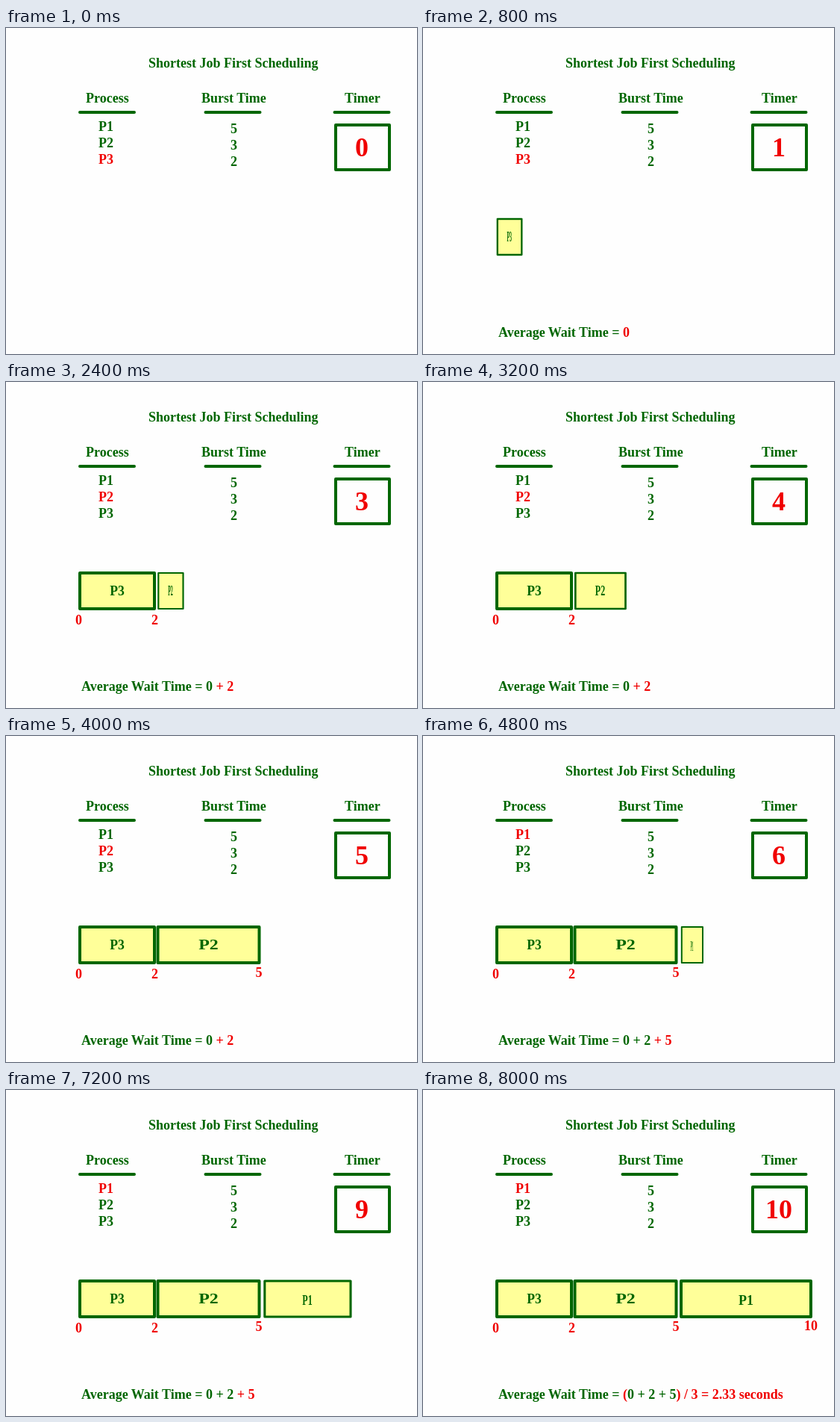
Write an HTML page that moves like this. It is 551 px wide and 437 px high and loops after 8800 ms.

```html
<!DOCTYPE html>
<html lang="en">
<head>
<meta charset="utf-8">
<title>Shortest Job First Scheduling</title>
<style>
  html, body { margin: 0; width: 100%; height: 100%; overflow: hidden; background: #fefefe; }
  svg { display: block; }
  text { font: bold 18px "Liberation Serif", "Times New Roman", serif; fill: #060; white-space: pre; }
  .mid { text-anchor: middle; }
  .red { fill: #f00000; }
  #timer { font-size: 36px; }
  .rule, .box { stroke: #060; stroke-width: 4; stroke-linecap: round; stroke-linejoin: round; fill: none; }
  .bar { fill: #ff9; }
</style>
</head>
<body>
<svg id="stage" width="551" height="437" viewBox="0 0 551 437">
  <text x="191" y="53">Shortest Job First Scheduling</text>
  <text x="107" y="100">Process</text>
  <text x="262" y="100">Burst Time</text>
  <text x="454" y="100">Timer</text>
  <path class="rule" d="M99 113H172M267.500 113H340.500M440.500 113H513.500"/>
  <rect class="box" x="442" y="130" width="72" height="60"/>
  <text id="timer" class="mid red" x="477" y="172"></text>
</svg>
<script>
const STEP = 800, STEPS = 11;
const stage = document.getElementById("stage");
const timer = document.getElementById("timer");

function add(tag, attrs, content = "", parent = stage) {
  const node = document.createElementNS("http://www.w3.org/2000/svg", tag);
  for (const key in attrs) node.setAttribute(key, attrs[key]);
  node.textContent = content;
  parent.append(node);
  return node;
}

function show(node, on) {
  node.style.display = on ? "" : "none";
}

// start: first tick of the job; full: tick at which its bar is complete
const jobs = [
  { name: "P1", burst: 5, row: 0, start: 5, full: 10, x: 346, w: 174, base: 288, stretch: 1 },
  { name: "P2", burst: 3, row: 1, start: 2, full: 5, x: 203.5, w: 136, base: 286, stretch: 1.33 },
  { name: "P3", burst: 2, row: 2, start: 0, full: 3, x: 99, w: 100, base: 286, stretch: 0.98 }
];

for (const job of jobs) {
  const y = 138 + 22 * job.row;
  job.title = add("text", { x: 124, y }, job.name);
  add("text", { x: 305.5, y: y + 3, class: "mid" }, job.burst);
  job.bar = add("rect", { class: "box bar", y: 256, height: 48 });
  job.label = add("text", { class: "mid" }, job.name);
}

const marks = [[0, 97.5, 325, 3], [2, 199.5, 325, 3], [5, 339, 323, 5], [10, 520, 322, 10]]
  .map(([value, x, y, from]) => ({ from, node: add("text", { x, y, class: "mid red" }, value) }));

const average = add("text", { x: 101, y: 414 });

// pieces of the sum; a leading * marks red
function sumParts(tick) {
  if (tick < 1) return [];
  if (tick < 3) return ["Average Wait Time = ", "*0"];
  if (tick < 6) return ["Average Wait Time = 0 ", "*+ 2"];
  if (tick < 10) return ["Average Wait Time = 0 + 2 ", "*+ 5"];
  return ["Average Wait Time = ", "*(", "0 + 2 + 5", "*) / 3 = 2.33 seconds"];
}

function drawJob(job, tick) {
  const begun = tick > job.start;
  const done = tick >= job.full;
  const part = done ? 1 : (tick - job.start) / (job.burst + 1);
  const current = job.start === 0 ? tick <= 2 : begun && tick <= job.start + job.burst;
  job.title.setAttribute("class", current ? "red" : "");
  show(job.bar, begun);
  show(job.label, begun);
  if (!begun) return;

  const inset = done ? 0 : 0.8;
  const w = job.w * part;
  job.bar.setAttribute("x", job.x + inset);
  job.bar.setAttribute("width", w - inset);
  job.bar.style.strokeWidth = done ? 4 : 1.6 + 2.2 * part;
  job.label.setAttribute("transform",
    `translate(${job.x + w / 2} ${job.base}) scale(${part * job.stretch} 1)`);
}

function draw(tick) {
  timer.textContent = tick;
  jobs.forEach(job => drawJob(job, tick));
  marks.forEach(mark => show(mark.node, tick >= mark.from));
  average.textContent = "";
  for (const part of sumParts(tick)) {
    const red = part[0] === "*";
    add("tspan", red ? { class: "red" } : {}, red ? part.slice(1) : part, average);
  }
}

let shown = -1;
const origin = performance.now();
function frame() {
  const tick = Math.floor((performance.now() - origin) / STEP) % STEPS;
  if (tick !== shown) draw(shown = tick);
  requestAnimationFrame(frame);
}
frame();
</script>
</body>
</html>
```
